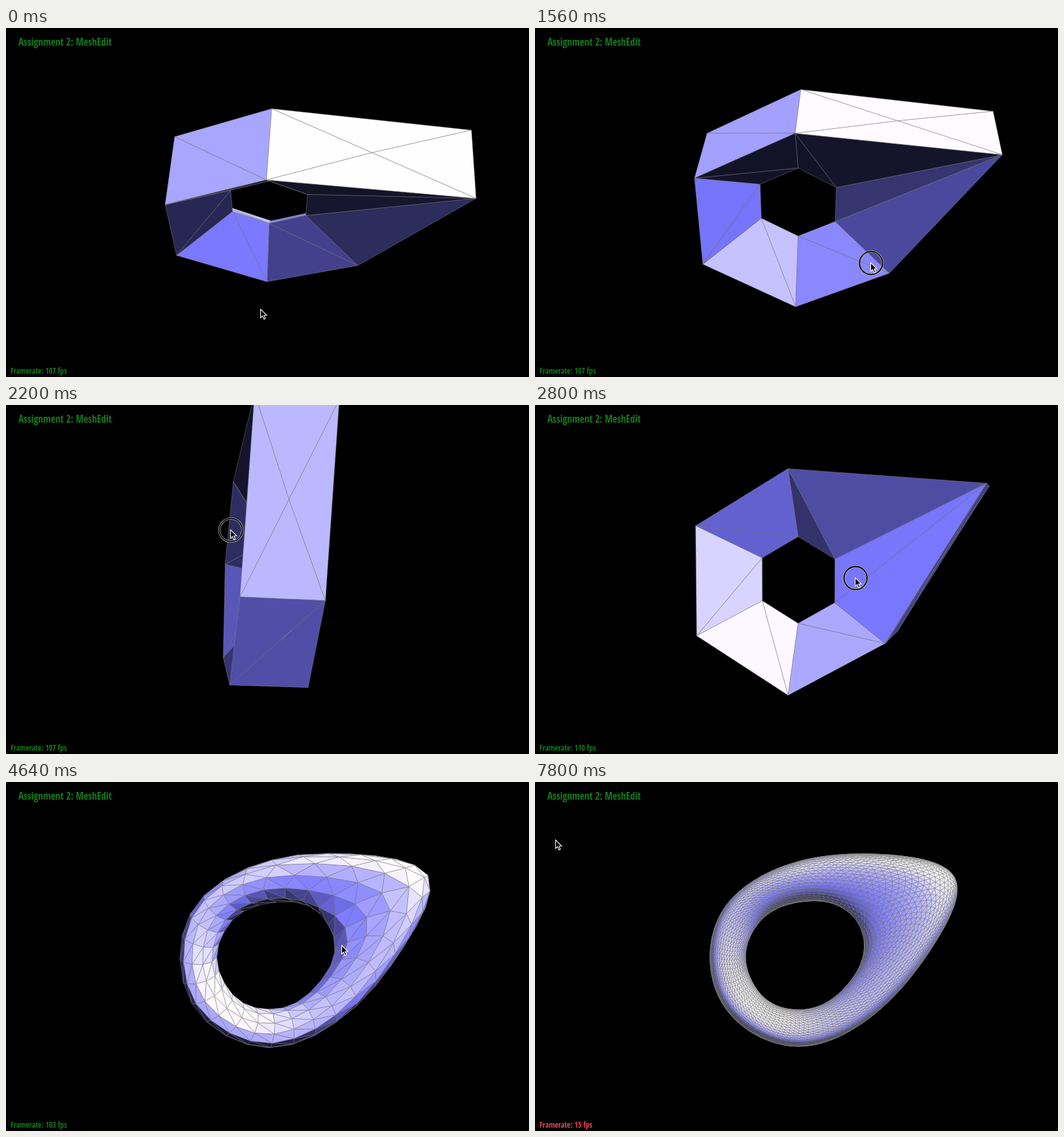
Animation of 800 by 533 pixels, one loop 7840 ms. Source, as an HTML page with a canvas:

```html
<!DOCTYPE html>
<html lang="en">
<head>
<meta charset="utf-8">
<title>MeshEdit</title>
<style>
html, body { margin: 0; width: 100%; height: 100%; overflow: hidden; background: #000; }
canvas { position: absolute; left: 0; top: 0; width: 800px; height: 533px; }
.label {
  position: absolute; white-space: pre; line-height: 20px; color: #147a1c;
  font-family: "Open Sans Condensed", "Open Sans", "Noto Sans", sans-serif;
  font-weight: bold; font-stretch: condensed;
}
#title { left: 19px; top: 11px; font-size: 15.2px; }
#fps { left: 7px; top: 512.5px; font-size: 11.7px; }
</style>
</head>
<body>
<canvas id="stage" width="800" height="533"></canvas>
<div class="label" id="title">Assignment 2: MeshEdit</div>
<div class="label" id="fps"></div>
<script>
const LOOP = 7840, STEP = 40;
const UNIT = 66.4, FOCAL = 1270, CX = 402.5, CY = 267.5;
// Directional lights in camera space, scaled by their strength
const LIGHTS = [[0.83, 0.87, 0.87], [0.03, 0.32, 0.65]], AMBIENT = 0.155;
const PRESS = 800, RELEASE = 3960;

// [time, x, y] of the pointer tip
const pointerPath = [
  [0, 390, 430], [120, 390, 430], [680, 515, 421.5], [820, 515, 421.5], [1400, 515, 366],
  [1560, 514, 359], [2200, 344, 191], [2440, 362, 208], [2900, 526, 280],
  [3240, 516, 259.5], [3700, 514, 250], [7160, 514, 250], [7640, 32, 89], [7840, 32, 89]
];
const levelTimes = [4200, 4440, 5000, 5680];
const fpsSteps = [[0, 107], [2440, 110], [4400, 103], [5400, 86], [6560, 15]];

const mid = (p, q) => p.map((v, i) => (v + q[i]) / 2);
const combine = terms => [0, 1, 2].map(i => terms.reduce((s, [w, p]) => s + w * p[i], 0));

// Hexagonal torus with a triangular section; one outer corner is pulled away.
function baseMesh() {
  const points = [], faces = [];
  const h = Math.sqrt(3) / 2;
  for (let i = 0; i < 6; i++) {
    const angle = Math.PI / 2 - i * Math.PI / 3;
    for (const [r, z] of [[2.5, -h], [2.5, h], [1, 0]]) {
      const pulled = i === 1 && r > 1;
      points.push(pulled ? [4.227, 2.149, z * 0.955] : [r * Math.cos(angle), r * Math.sin(angle), z]);
    }
  }
  const id = (i, k) => (i % 6) * 3 + k % 3;
  for (let i = 0; i < 6; i++) {
    for (let k = 0; k < 3; k++) {
      const a = id(i, k), b = id(i + 1, k), c = id(i + 1, k + 1), d = id(i, k + 1);
      if (k === 0 && i < 2) {
        const m = points.push(mid(points[a], points[c])) - 1;
        faces.push([a, d, m], [d, c, m], [c, b, m], [b, a, m]);
      } else {
        faces.push([a, c, b], [a, d, c]);
      }
    }
  }
  return { points, faces };
}

// One step of Loop subdivision on a closed mesh
function subdivide({ points, faces }) {
  const edges = new Map(), neighbours = points.map(() => new Set());
  const key = (a, b) => Math.min(a, b) * points.length + Math.max(a, b);
  for (const f of faces) {
    for (let j = 0; j < 3; j++) {
      const a = f[j], b = f[(j + 1) % 3], k = key(a, b);
      if (!edges.has(k)) edges.set(k, { a, b, opposite: [] });
      edges.get(k).opposite.push(f[(j + 2) % 3]);
      neighbours[a].add(b);
      neighbours[b].add(a);
    }
  }
  const next = points.map((p, i) => {
    const n = neighbours[i].size, u = n === 3 ? 3 / 16 : 3 / (8 * n);
    return combine([[1 - n * u, p], ...[...neighbours[i]].map(j => [u, points[j]])]);
  });
  for (const e of edges.values()) {
    e.id = next.push(combine([
      [3 / 8, points[e.a]], [3 / 8, points[e.b]],
      ...e.opposite.map(o => [1 / 8, points[o]])
    ])) - 1;
  }
  const split = [];
  for (const [a, b, c] of faces) {
    const ab = edges.get(key(a, b)).id, bc = edges.get(key(b, c)).id, ca = edges.get(key(c, a)).id;
    split.push([a, ab, ca], [ab, b, bc], [ca, bc, c], [ab, bc, ca]);
  }
  return { points: next, faces: split };
}

const meshes = [baseMesh()];
for (let i = 0; i < levelTimes.length; i++) meshes.push(subdivide(meshes[i]));

function pointerAt(t) {
  const i = Math.max(1, pointerPath.findIndex(p => p[0] > t));
  const [t0, x0, y0] = pointerPath[i - 1], [t1, x1, y1] = pointerPath[i];
  const u = (t - t0) / (t1 - t0);
  return [x0 + (x1 - x0) * u, y0 + (y1 - y0) * u];
}

function shade(p, q, r) {
  const u = q.map((v, i) => v - p[i]), v = r.map((w, i) => w - p[i]);
  const n = [u[1] * v[2] - u[2] * v[1], u[2] * v[0] - u[0] * v[2], u[0] * v[1] - u[1] * v[0]];
  const len = Math.hypot(...n) || 1;
  const lit = light => Math.max(0, n.reduce((s, w, i) => s + w * light[i], 0) / len);
  const level = LIGHTS.reduce((s, light) => s + lit(light), AMBIENT);
  const [red, green, blue] = [122, 119.5, 255].map(w => Math.min(255, Math.round(w * level)));
  return `rgb(${red},${green},${blue})`;
}

function drawMesh(g, { points, faces }, theta, phi) {
  const st = Math.sin(theta), ct = Math.cos(theta), sp = Math.sin(phi), cp = Math.cos(phi);
  const eye = points.map(([x, y, z]) => {
    const front = x * st + z * ct;
    return [x * ct - z * st, y * sp - front * cp, y * cp + front * sp].map(v => v * UNIT);
  });
  const screen = eye.map(([x, y, z]) => {
    const s = 1 / (1 - z / FOCAL);
    return [CX + x * s, CY - y * s];
  });
  const visible = faces.filter(([a, b, c]) => {
    const [p, q, r] = [screen[a], screen[b], screen[c]];
    return (q[0] - p[0]) * (r[1] - p[1]) - (q[1] - p[1]) * (r[0] - p[0]) < 0;
  });
  const depth = f => eye[f[0]][2] + eye[f[1]][2] + eye[f[2]][2];
  visible.sort((f, k) => depth(f) - depth(k));

  g.clearRect(0, 0, 800, 533);
  g.lineWidth = 0.48;
  g.lineJoin = "round";
  g.strokeStyle = "#808080";
  for (const f of visible) {
    g.fillStyle = shade(...f.map(i => eye[i]));
    g.beginPath();
    f.forEach(i => g.lineTo(...screen[i]));
    g.closePath();
    g.fill();
    g.stroke();
  }
}

function drawPointer(g, x, y, pressed) {
  if (pressed) {
    for (const [color, width] of [["#b0b0b0", 3.4], ["#000", 1.8]]) {
      g.strokeStyle = color;
      g.lineWidth = width;
      g.beginPath();
      g.arc(x, y, 17.6, 0, 2 * Math.PI);
      g.stroke();
    }
  }
  const arrow = [[0, 0], [0, 13], [3, 10.3], [5.1, 15.2], [7.3, 14.3], [5.2, 9.5], [9.3, 9.3]];
  g.beginPath();
  arrow.forEach(([dx, dy]) => g.lineTo(x + dx - 0.5, y + dy - 0.5));
  g.closePath();
  g.fillStyle = "#000";
  g.fill();
  g.strokeStyle = "#fff";
  g.lineWidth = 1.1;
  g.stroke();
}

const stage = document.getElementById("stage").getContext("2d");
const meshLayer = document.createElement("canvas");
meshLayer.width = 800;
meshLayer.height = 533;
const meshContext = meshLayer.getContext("2d");
const fpsLabel = document.getElementById("fps");
let drawnState = "";

function render(t) {
  const [x, y] = pointerAt(t);
  const [dragX, dragY] = pointerAt(Math.min(RELEASE, Math.max(PRESS, t)));
  const rad = Math.PI / 180;
  const theta = (4 + 0.4625 * (514 - dragX)) * rad;
  const phi = (51.5 + 0.358 * (359 - dragY)) * rad;
  const level = levelTimes.filter(start => t >= start).length;

  const state = [level, theta, phi].join();
  if (state !== drawnState) {
    drawMesh(meshContext, meshes[level], theta, phi);
    drawnState = state;
  }
  stage.fillStyle = "#000";
  stage.fillRect(0, 0, 800, 533);
  stage.drawImage(meshLayer, 0, 0);
  drawPointer(stage, x, y, t >= PRESS && t < RELEASE);

  const fps = fpsSteps.filter(([start]) => t >= start).pop()[1];
  fpsLabel.textContent = `Framerate: ${fps} fps`;
  fpsLabel.style.color = fps < 20 ? "#e0465a" : "";
}

const start = performance.now();
function tick() {
  const t = (performance.now() - start) % LOOP;
  render(Math.floor(t / STEP) * STEP);
  requestAnimationFrame(tick);
}
tick();
</script>
</body>
</html>
```
